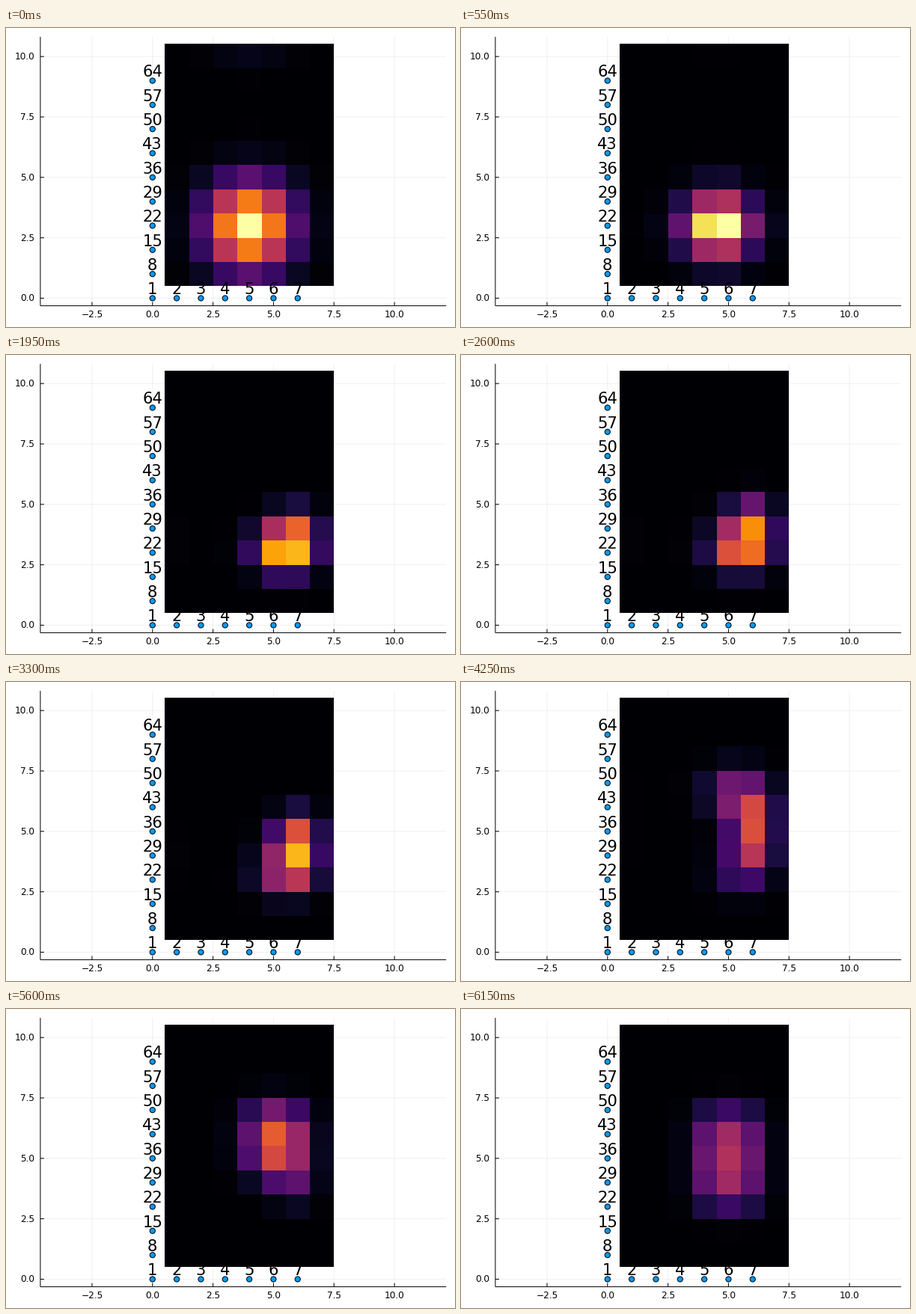
A matplotlib script for the animation above (6.2 s loop, 600x400 px).

```python
import numpy as np
import matplotlib.pyplot as plt
from matplotlib.animation import FuncAnimation
from matplotlib.patches import Circle

W, H, DPI = 600, 400, 100
STEP, LOOP = 50, 6200
PT = 72 / DPI                        # points per pixel
UNIT, OX, OY = 32.33, 195.8, 361.46  # pixels per unit, pixel place of (0, 0)
LEFT, RIGHT, TOP, BOTTOM = 45.9, 588.2, 11.8, 371.6
COLS, ROWS = 7, 10
TAIL = 1.7                           # falloff power of a bump

# Stops of the three bumps: time, height, column, row
START = [(0, 1, 4, 3), (550, 1.19, 4.56, 3), (1950, 1.08, 5.48, 3.2),
         (3300, 0.47, 5.48, 3.3), (5000, 0, 5.48, 3.3)]
RISE = [(900, 0, 5.92, 3.6), (3300, 0.72, 5.92, 4.4), (4250, 0.58, 5.92, 5),
        (5000, 0.31, 5.92, 5.33), (6150, 0.383, 5.55, 5)]
TURN = [(3300, 0, 5.6, 6.9), (5000, 0.66, 5.12, 6.45), (6150, 0.383, 4.45, 5)]


def px(x):
    return OX + UNIT * x


def py(y):
    return OY - UNIT * y


def ramp(t, begin, end):
    return np.clip((t - begin) / (end - begin), 0, 1)


def ring_distance(count, center):
    """Distance of each cell from center; the grid joins at its edges."""
    cells = np.arange(1, count + 1)
    return np.abs((cells - center + count / 2) % count - count / 2)


def bump(t, stops, wx, wy, x_power=TAIL, y_power=TAIL):
    times, *tracks = np.transpose(stops)
    height, cx, cy = (np.interp(t, times, track) for track in tracks)
    across = np.exp(-(ring_distance(COLS, cx) / wx) ** x_power)
    along = np.exp(-(ring_distance(ROWS, cy) / wy) ** y_power)
    return height * np.outer(along, across)


def field(t):
    shrink = np.exp(-t / 520)
    power = TAIL + 0.3 * np.exp(-t / 150)
    stretch = ramp(t, 1950, 6150)
    settle = ramp(t, 5000, 6150)
    return (bump(t, START, 1.02 + 0.64 * shrink, 0.87 + 0.84 * shrink,
                 power, power)
            + bump(t, RISE, 0.84, 0.9 + 1.13 * stretch,
                   y_power=2 + 1.4 * stretch)
            + bump(t, TURN, 1.1 - 0.26 * settle, 0.98 + 1.05 * settle,
                   y_power=2 + 1.4 * settle))


def edges(begin, end, count):
    """Cell borders on whole pixels."""
    return np.ceil(np.linspace(begin, end, count + 1) - 1e-6)


def line(x, y, zorder=3, **style):
    ax.plot(x, y, color="black", lw=PT, zorder=zorder,
            solid_capstyle="butt", **style)


def label(x, y, text, size, ha="center"):
    ax.text(x, y, text, fontsize=size * PT, ha=ha, va="baseline", zorder=5)


def mark(x, y, number):
    ax.add_patch(Circle((px(x), py(y)), 3.6, fc="#009afa", ec="black",
                        lw=PT, zorder=4))
    label(px(x), py(y) - 5, str(number), 21.2)


plt.rcParams["font.family"] = "DejaVu Sans"
plt.rcParams["path.snap"] = False
fig = plt.figure(figsize=(W / DPI, H / DPI), dpi=DPI, facecolor="white")
ax = fig.add_axes([0, 0, 1, 1])
ax.set_xlim(0, W)
ax.set_ylim(H, 0)
ax.axis("off")

mesh = ax.pcolormesh(edges(212, 438, COLS), edges(21, 345, ROWS),
                     field(0)[::-1], cmap="inferno", vmin=0, vmax=1,
                     antialiased=False, zorder=2)

for value in np.arange(-2.5, 10.1, 2.5):
    name = f"{value:.1f}".replace("-", "\u2212")
    x, y = px(value), py(value)
    line([x, x], [TOP, BOTTOM], zorder=1, alpha=0.06)
    line([x, x], [BOTTOM - 5, BOTTOM])
    label(x, 387, name, 12.1)
    if value >= 0:
        line([LEFT, RIGHT], [y, y], zorder=1, alpha=0.06)
        line([LEFT, LEFT + 5], [y, y])
        label(38.3, y + 4, name, 12.1, ha="right")
line([LEFT, LEFT], [TOP, BOTTOM])
line([LEFT, RIGHT], [BOTTOM, BOTTOM])

for row in range(ROWS):
    mark(0, row, row * COLS + 1)
for col in range(1, COLS):
    mark(col, 0, col + 1)


def update(frame):
    t = frame * STEP
    if t > 2000:  # the later part advances every second step
        t -= (t - STEP) % (2 * STEP)
    mesh.set_array(field(t)[::-1])
    return [mesh]


anim = FuncAnimation(fig, update, frames=LOOP // STEP, interval=STEP,
                     repeat=True, repeat_delay=0, blit=False)
plt.show()
```
